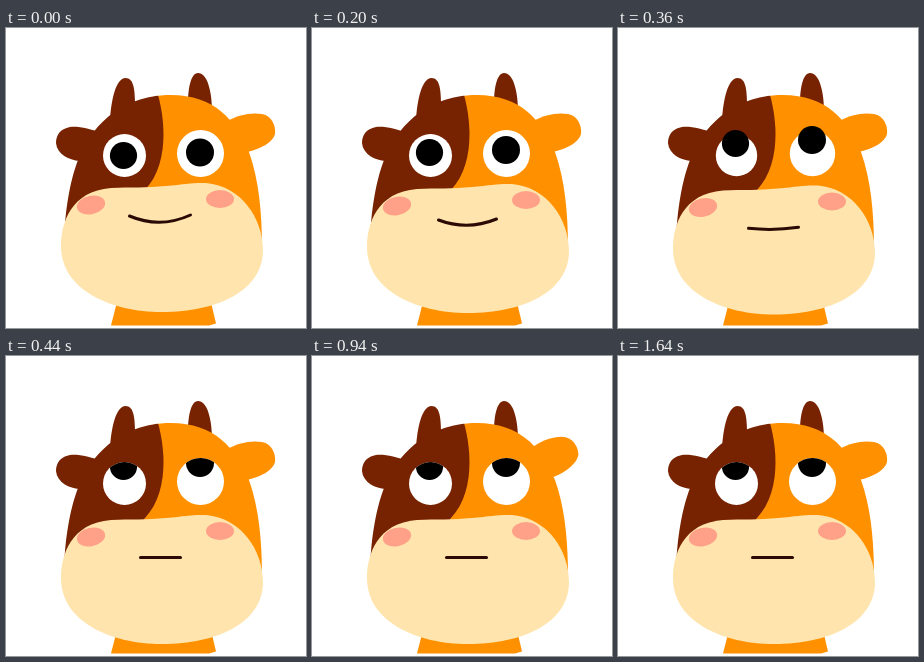
Animation of 300x300 px, one loop 2.04 s. Source, as an HTML page:

```html
<!DOCTYPE html>
<html lang="en">
<head>
<meta charset="utf-8">
<title>Calf looking up</title>
<style>
  html, body { margin: 0; width: 100%; height: 100%; overflow: hidden; background: #fff; }
  svg { display: block; width: 100vw; height: 100vh; }
  .brown { fill: #772200; }
  .orange { fill: #ff9100; }
  .cream { fill: #ffe5ad; }
  .pink { fill: #ffa188; }
</style>
</head>
<body>
<svg viewBox="0 0 300 300">
  <defs>
    <path id="head" d="M58 220C58 190 63 155 72 132C85 98 115 67 165 67C208 67 230 92 243 124C253 152 256 185 256 220Z"/>
    <clipPath id="leftHalf">
      <path d="M40 60H150L152 67C160 95 162 138 139 162L100 230H40Z"/>
    </clipPath>
    <clipPath id="rightHalf"><path d="M151 60H300V230H100L139 162Z"/></clipPath>
    <clipPath id="eyeClip">
      <circle cx="118.5" cy="127.5" r="21.5"/>
      <circle cx="194.5" cy="125.5" r="23.5"/>
    </clipPath>
  </defs>

  <path class="orange" d="M112 270L105 297.5H203L210 295.5L204 270Z"/>

  <g class="brown">
    <path d="M104 92C105 72 110 50 119.5 50C128 50 129 62 129 80Z"/>
    <path d="M182 85C181 60 185 45 192 45C201 45 206 62 206 85Z"/>
    <path d="M96 105C84 101 73 98 64 99C54 101 50 107 50 115C51 126 62 132 74 133Z"/>
  </g>
  <path id="ear" class="orange" d="M221 93C232 87 245 84 256 86C266 88 270 98 269 106C267 114 255 121 241 124L220 115Z"/>

  <use href="#head" class="orange" clip-path="url(#rightHalf)"/>
  <use href="#head" class="brown" clip-path="url(#leftHalf)"/>

  <circle id="eyeL" cx="118.5" cy="127.5" fill="#fff"/>
  <circle id="eyeR" cx="194.5" cy="125.5" fill="#fff"/>
  <g id="pupils">
    <circle id="pupilL" cx="117.5" r="13.6"/>
    <circle id="pupilR" cx="194" r="14"/>
  </g>

  <g id="muzzle">
    <path class="cream" d="M55 218C55 195 65 163 105 160C125 159 140 160 160 158C180 156 187 154.5 200 155C235 158 257 190 257 222C257 263 211 284 156 284C105 284 55 262 55 218Z"/>
    <ellipse class="pink" cx="85" cy="177" rx="14.3" ry="9.3" transform="rotate(-12 85 177)"/>
    <ellipse class="pink" cx="214" cy="171" rx="14" ry="9"/>
  </g>
  <path id="mouth" fill="none" stroke="#2b0a05" stroke-width="3" stroke-linecap="round"/>
</svg>
<script>
  const LOOP = 2040;
  const $ = id => document.getElementById(id);
  const [ear, eyeL, eyeR, pupils, pupilL, pupilR, muzzle, mouth] =
    ['ear', 'eyeL', 'eyeR', 'pupils', 'pupilL', 'pupilR', 'muzzle', 'mouth'].map($);

  // mouth: left x, left y, right x, right y, curve control y
  const poses = [
    { at: 0,   look: [127.5, 124.5], drop: 0,   mouth: [123.5, 188, 184.5, 187, 201] },
    { at: 200, look: [124.5, 122],   drop: 1,   mouth: [126.5, 192, 184.5, 191, 203] },
    { at: 280, look: [121.5, 118],   drop: 2,   mouth: [129.5, 196, 183.5, 195.5, 202.5] },
    { at: 360, look: [115.5, 112],   drop: 2.5, mouth: [130.5, 200.3, 180.5, 199.3, 203], squint: 0.8 },
    { at: 440, look: [110.5, 107],   drop: 4,   mouth: [134.5, 201.5, 174.5, 201.5, 201.5], hidden: true }
  ];

  function draw(t) {
    const { look, drop, mouth: [x1, y1, x2, y2, bend], squint = 0, hidden } =
      poses.findLast(p => p.at <= t);
    eyeL.setAttribute('r', 21.5 - squint);
    eyeR.setAttribute('r', 23.5 - squint);
    pupilL.setAttribute('cy', look[0]);
    pupilR.setAttribute('cy', look[1]);
    pupils.setAttribute('clip-path', hidden ? 'url(#eyeClip)' : 'none');
    muzzle.setAttribute('transform', `translate(0 ${drop})`);
    mouth.setAttribute('d', `M${x1} ${y1}Q${(x1 + x2) / 2} ${bend} ${x2} ${y2}`);
    const flick = t >= 940 && t < 1040;
    ear.setAttribute('transform', `rotate(${flick ? -10 : 0} 223 117)`);
  }

  const start = performance.now();
  function tick() {
    draw((performance.now() - start) % LOOP);
    requestAnimationFrame(tick);
  }
  tick();
</script>
</body>
</html>
```
